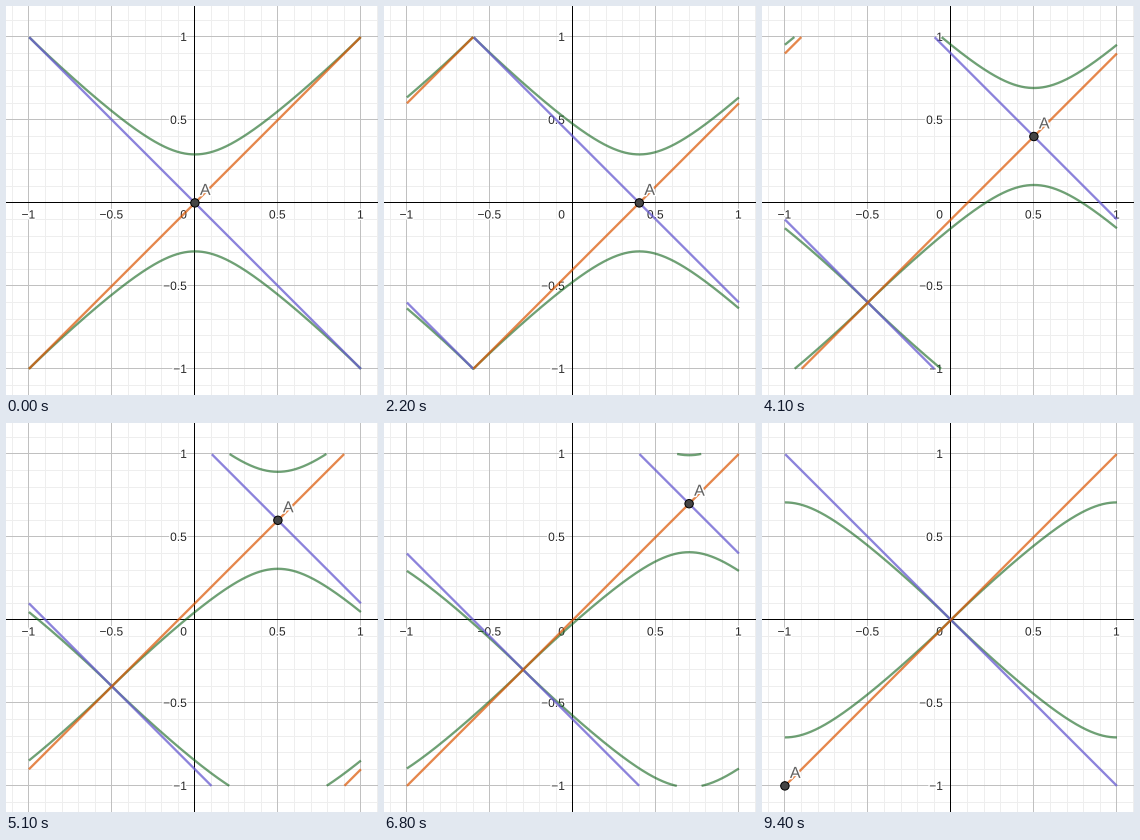
These frames come from a looping animation (372 by 389 pixels, 10 s). A matplotlib script:

```python
import numpy as np
import matplotlib.pyplot as plt
from matplotlib.animation import FuncAnimation
from matplotlib.patches import Circle, Rectangle
from matplotlib.patheffects import withStroke

W, H = 372, 389
DPI = 72                      # one point equals one pixel
OX, OY, UNIT = 188.9, 196.9, 166
GAP = 0.292
STEP_MS = 100
FRAMES = 100
FONT = "Liberation Sans"
GREEN, PURPLE, ORANGE = "#10621a", "#665ad0", "#db5400"


def smooth(u):
    return u * u * (3 - 2 * u)


def ease_out(u):
    return 1 - (1 - u)**2


# start ms, duration ms, shift in x, shift in y, easing
DRAGS = [
    (1295, 1400, 0.5, 0, smooth),
    (3500, 1300, 0, 0.5, ease_out),
    (4900, 1370, 0, 0.2, ease_out),
    (6701, 200, 0.4, 0.1, smooth),
    (7100, 100, 0.1, 0.1, smooth),
    (8600, 100, 0, 0.1, smooth),
]


def px(x):
    return OX + UNIT * x


def py(y):
    return OY - UNIT * y


def wrap(v):
    return (v + 1) % 2 - 1


def point_at(ms):
    """Dragged point, snapped to the fine grid on the periodic square."""
    pos = np.zeros(2)
    for start, length, dx, dy, ease in DRAGS:
        pos += ease(np.clip((ms - start) / length, 0, 1)) * np.array([dx, dy])
    return wrap(np.round(pos, 1))


fig = plt.figure(figsize=(W / DPI, H / DPI), dpi=DPI, facecolor="white")
ax = fig.add_axes([0, 0, 1, 1])
ax.set_xlim(0, W)
ax.set_ylim(H, 0)
ax.axis("off")


def cross(k, color, z):
    """Crisp pixel-wide grid lines at k tenths on both axes."""
    x, y = np.floor(px(k / 10)), np.floor(py(k / 10))
    for corner, w, h in [((x, 0), 1, H), ((0, y), W, 1)]:
        ax.add_patch(Rectangle(corner, w, h, fc=color, lw=0, aa=False, zorder=z))


def label(x, y, text, ha, size=12, color="#252525", z=3):
    return ax.text(x, y, text, ha=ha, va="baseline", family=FONT,
                   fontsize=size, color=color, zorder=z,
                   path_effects=[withStroke(linewidth=3, foreground="white")])


def curve(color, alpha, z):
    return ax.plot([], [], color=color, alpha=alpha, lw=2.3, zorder=z,
                   solid_capstyle="butt", solid_joinstyle="round")[0]


for k in range(-12, 13):
    if k % 5:
        cross(k, "#eeeeee", 0)
    else:
        cross(k, "#c0c0c0", 1)
cross(0, "black", 2)

for v in (-1, -0.5, 0.5, 1):
    name = f"{v:g}".replace("-", "\u2212")
    label(px(v) - 0.5, 212.5, name, "center")
    label(181, py(v) + 4, name, "right")
label(181, 212.5, "0", "right")

upper = curve(GREEN, 0.6, 4)
lower = curve(GREEN, 0.6, 4)
falling = curve(PURPLE, 0.75, 5)
rising = curve(ORANGE, 0.7, 6)

dot = Circle((OX, OY), 4.2, fc="#444444", ec="black", lw=1, zorder=9)
ax.add_patch(dot)
tag = label(0, 0, "A", "left", 16, "#616161", 8)

X = np.linspace(-1, 1, 2001)


def set_curve(line, y):
    """Plot y on the periodic square, broken where it wraps around."""
    y = wrap(y)
    y[1:][np.abs(np.diff(y)) > 1] = np.nan
    line.set_data(px(X), py(y))


def update(i):
    a, b = point_at(i * STEP_MS)
    d = wrap(X - a)
    energy = np.sqrt(d**2 + GAP**2 * np.clip(1 - d**2, 0, 1)**1.5)
    set_curve(upper, b + energy)
    set_curve(lower, b - energy)
    set_curve(falling, b - d)
    set_curve(rising, b + d)
    dot.center = (px(a), py(b))
    tag.set_position((px(a) + 5, py(b) - 8))
    return upper, lower, falling, rising, dot, tag


anim = FuncAnimation(fig, update, frames=FRAMES, interval=STEP_MS, repeat=True)
plt.show()
```
